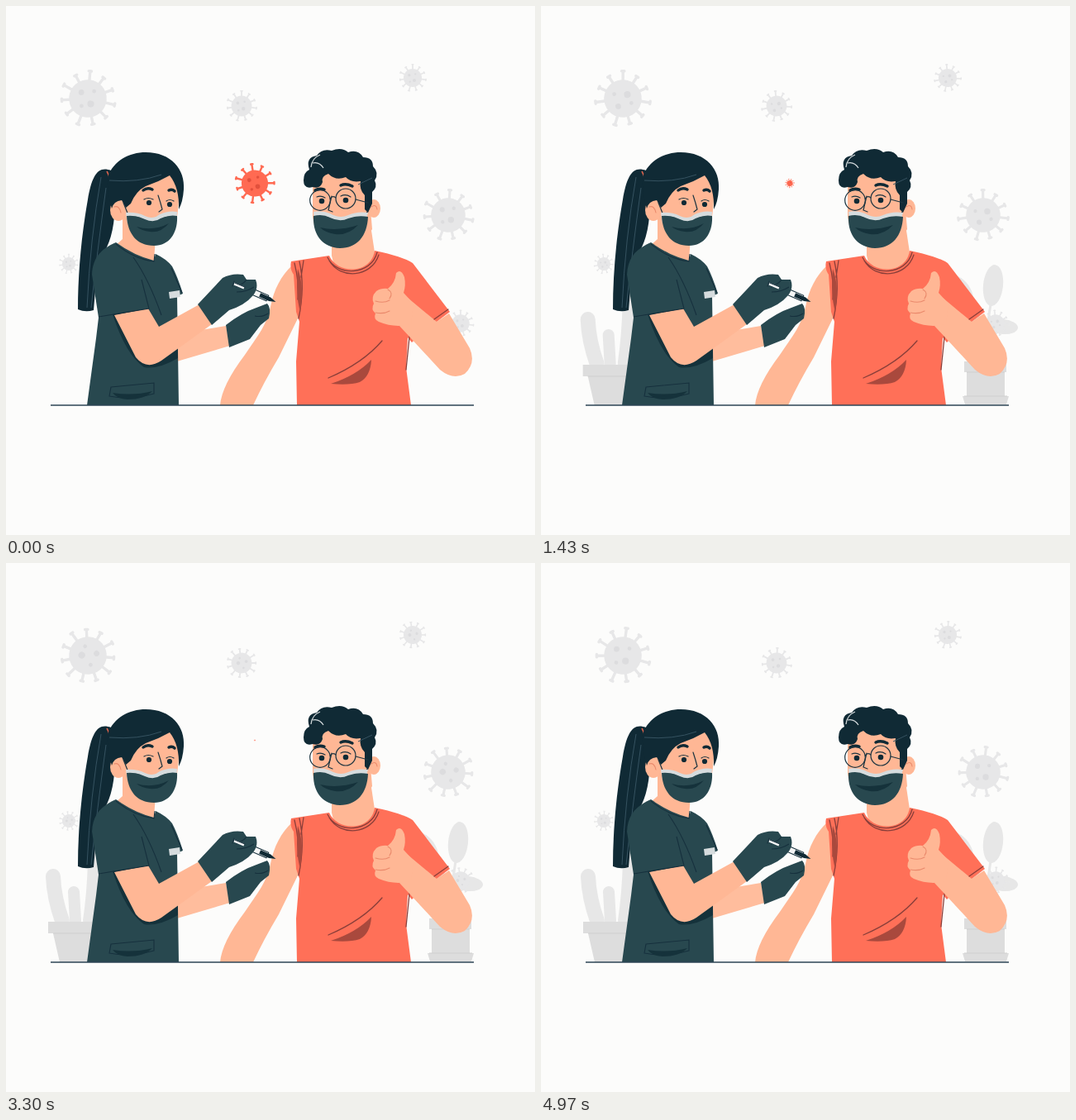
Recreate the animation shown at these times as an HTML page. Size 640 px wide and 640 px high, loop 5010 ms.

```html
<!DOCTYPE html>
<html lang="en">
<head>
<meta charset="utf-8">
<title>Vaccination</title>
<style>
  html, body { margin: 0; width: 100%; height: 100%; overflow: hidden; background: #fcfcfb; }
  svg { display: block; width: 100vw; height: 100vh; }
  .skin { fill: #ffb795; }
  .hair { fill: #102a35; }
  .cloth { fill: #28484f; }
  .shirt { fill: #ff7058; }
  .leaf { fill: #e7e7e7; }
  .pot { fill: #dddddd; }
  .pale { fill: #d6dcde; }
  .shade { fill: #15323b; }
  .line { fill: none; stroke: #1b3440; stroke-width: 1.2; stroke-linecap: round; }
  .seam { fill: none; stroke: #16303d; stroke-width: 1.1; }
  .sheen { fill: none; stroke: #355260; stroke-width: 1; }
  .fold { fill: none; stroke: #8a3f3a; stroke-width: 1.3; stroke-linecap: round; }
  .crease { fill: none; stroke: #ea8a6c; stroke-width: 1.1; stroke-linecap: round; }
  .brow { fill: none; stroke: #102a35; stroke-width: 3.4; stroke-linecap: round; }
  .stalk { fill: none; stroke: #e7e7e7; stroke-linecap: round; }
  .rim { fill: none; stroke: #cfcfcf; }
</style>
</head>
<body>
<svg viewBox="0 0 640 640">
  <g id="cactus">
    <path class="stalk" stroke-width="18" d="M57 379Q58 405 68 433"/>
    <path class="stalk" stroke-width="14" d="M82 398L84 433"/>
    <path class="stalk" stroke-width="20" d="M109 360Q108 400 103 433"/>
    <path class="pot" d="M51 434H124V448H119L113 483H65L57 448H51Z"/>
    <path class="rim" d="M57 448H119"/>
  </g>

  <g id="shrub">
    <path class="stalk" stroke-width="3" d="M538 432Q538 390 546 350M538 425Q520 390 505 355M538 418Q545 395 560 390"/>
    <ellipse class="leaf" cx="547" cy="338" rx="12" ry="25" transform="rotate(6 547 338)"/>
    <ellipse class="leaf" cx="507" cy="348" rx="14" ry="23" transform="rotate(-28 507 348)"/>
    <ellipse class="leaf" cx="559" cy="388" rx="18" ry="9" transform="rotate(5 559 388)"/>
    <ellipse class="leaf" cx="528" cy="384" rx="16" ry="9" transform="rotate(25 528 384)"/>
    <path class="pot" d="M512 430H563V443H561V472H566L563 482H513L510 472H515V443H512Z"/>
    <path class="rim" d="M515 443H561M512 472H564"/>
  </g>

  <g id="viruses"></g>

  <g id="nurse">
    <path class="hair" d="M127 199C111 193 104 205 99 234C91 279 87 325 87 367Q96 371 106 368L111 308Q128 290 131 255L138 215Z"/>
    <path class="sheen" d="M115 207Q102 280 98 365M121 220Q110 300 103 365"/>
    <path d="M122 200Q127 208 124 216" fill="none" stroke="#d9634c" stroke-width="1.6"/>
    <path fill="#ffbd9d" d="M180 401L266 387L271 411L200 432Z"/>
    <path class="skin" d="M141 250V282L132 290L150 304L179 308L181 280Z"/>
    <path class="skin" d="M143 215L170 195L208 207Q211 230 207 255L180 288Q154 286 146 262Z"/>
    <ellipse class="skin" cx="136" cy="247" rx="10" ry="13"/>
    <path class="crease" d="M131 243Q137 241 139 250"/>
    <path class="cloth" d="M133 286C115 294 105 304 104 325L112 377L109 402L98 483H209L207 351L214 348Q207 326 201 315Q194 306 181 300L179 308Q155 302 133 286Z"/>
    <path class="shade" d="M129 373L172 366L193 410L208 404V426Q184 440 167 437Q145 422 129 373Z"/>
    <path class="skin" d="M131 374L172 366L185 388L234 361L249 385L188 429Q170 441 157 425Z"/>
    <path class="seam" d="M133 288Q155 306 179 309L180 300M112 376L173 366L164 331M154 304Q173 331 188 374M200 317L213 347M127 461L179 456V469Q151 477 125 472Z"/>
    <path class="shade" d="M129 468Q154 472 177 466Q168 476 147 476Q134 475 129 468Z"/>
    <path class="pale" d="M197 346L210 344L211 352L198 354Z"/>

    <path class="hair" d="M123 207C130 187 149 177 169 177C200 177 217 198 215 222Q214 237 209 246Q210 220 198 205Q184 213 169 218Q157 224 151 239L145 244L140 235Q130 236 128 245Q122 225 123 207Z"/>
    <path class="sheen" d="M125 211Q160 214 188 204"/>
    <path class="brow" d="M166 223Q171 219 177 222M197 223Q201 221 204 224"/>
    <circle class="hair" cx="173" cy="238" r="3.1"/>
    <circle class="hair" cx="198" cy="240" r="3.1"/>
    <path class="line" d="M167 234Q172 231 178 234M194 236Q198 233 203 236M184 229Q187 238 189 246L185 249M142 238L148 253"/>
    <path class="pale" d="M145 250Q158 249 168 254Q178 259 186 252Q197 247 207 249L206 262L147 263Z"/>
    <path class="cloth" d="M146 254Q158 253 168 258Q179 263 187 257Q198 252 207 254C208 273 199 290 179 290C158 290 147 275 146 254Z"/>
    <path class="shade" d="M158 267Q178 273 197 263Q187 275 174 273Q164 272 158 267Z"/>
  </g>

  <g id="patient">
    <path class="skin" d="M346 314C333 326 324 343 320 364C316 385 304 400 289 422Q261 459 259 483H299Q312 455 330 425L353 378L366 340Z"/>
    <path class="skin" d="M394 270V302Q400 332 420 330Q440 328 446 298L441 265Z"/>
    <path class="shirt" d="M391 302L345 309Q343 318 348 325L351 370L355 382L351 430L352 483H490L484 437L486 401L491 407L500 398L537 370L492 311Q480 303 446 296C442 324 402 326 391 302Z"/>
    <path class="fold" d="M389 304C400 328 442 326 449 298M391 308C404 331 442 329 451 301M355 309Q362 340 354 378M349 311Q355 335 353 355M360 308L357 328M390 450Q432 432 455 405M489 391L484 440"/>
    <path d="M393 457Q424 447 442 428Q441 448 428 455Q416 459 393 457Z" fill="#a9493d"/>
    <path fill="#a9493d" d="M353 318Q361 338 356 370Q350 350 353 318Z"/>
    <path class="skin" d="M486 353L521 382L536 372L561 414Q569 432 555 445Q541 453 525 440L476 387Z"/>
    <path class="fold" d="M518 379L535 367"/>
    <path class="skin" d="M462 342Q471 335 472 323Q478 317 482 328Q484 338 481 347L493 360L490 385Q470 390 451 382Q444 379 447 372Q441 367 445 360Q441 352 448 345Q454 341 462 342Z"/>
    <path class="crease" d="M447 357Q457 360 464 356M447 371Q457 373 464 369M462 343Q469 347 464 354"/>

    <path class="skin" d="M371 215L390 198L438 210L443 270Q430 293 402 290Q375 286 371 255Z"/>
    <ellipse class="skin" cx="445" cy="245" rx="8" ry="11"/>
    <path class="crease" d="M442 243Q448 239 449 246"/>
    <path class="hair" d="M371 219Q360 222 360 211Q360 201 367 198Q362 183 376 181Q382 172 394 175Q406 170 414 177Q426 173 432 183Q444 183 444 194Q452 202 446 211Q450 219 443 225V239L438 250L434 246V229Q427 222 429 212Q417 214 411 207Q399 212 390 203Q381 206 383 213Q380 222 371 219Z"/>
    <path d="M369 195Q370 184 380 180M371 190Q379 188 384 196" fill="none" stroke="#d6dcde" stroke-width="1.2"/>
    <path class="sheen" d="M426 216L443 208"/>
    <path class="brow" d="M374 223Q379 220 385 222M405 217Q411 214 419 218"/>
    <circle class="hair" cx="382" cy="236" r="3.3"/>
    <circle class="hair" cx="411" cy="235" r="3.3"/>
    <g class="line">
      <circle cx="380" cy="235" r="12.3"/>
      <circle cx="411" cy="233" r="12"/>
      <path d="M392 233Q395 229 399 232M423 234L438 238M376 231Q381 229 386 232M405 230Q411 227 417 231M394 230L390 247L395 249M437 249L432 263"/>
    </g>
    <path class="pale" d="M372 249Q383 247 392 251Q404 258 414 253Q425 248 438 250L434 264L373 260Z"/>
    <path class="cloth" d="M372 254Q383 251 392 256Q404 262 414 257Q425 253 438 255C437 278 425 293 404 293C382 292 371 276 372 254Z"/>
    <path class="shade" d="M380 268Q402 273 426 265Q414 278 398 276Q386 274 380 268Z"/>
  </g>

  <path class="cloth" d="M266 386Q285 371 303 365L316 360Q321 365 318 378L308 386L295 403L270 413Z"/>
  <g transform="translate(276 336) rotate(23.5)">
    <path class="line" d="M0 -4V4M0 0H24"/>
    <rect x="20" y="-3.5" width="24" height="7" fill="#f4f5f5" stroke="#1b3440"/>
    <path class="hair" d="M34 -2.5H47L55 0L47 2.5H34Z"/>
  </g>
  <path class="cloth" d="M232 361L262 329Q273 323 287 325L291 331L302 331Q306 341 299 350Q289 362 270 368L249 386Z"/>
  <path class="seam" d="M278 340Q288 336 291 331M279 346Q291 346 300 340M301 375Q310 377 317 372"/>
  <path d="M276 336L288 341" stroke="#f4f5f5" stroke-width="3"/>
  <path class="line" d="M276 333L274 339M277 335L289 340"/>
  <path d="M54 483H566" stroke="#2c4555" stroke-width="1.6"/>
</svg>

<script>
const LOOP = 5010;
const layer = document.getElementById('viruses');
const cactus = document.getElementById('cactus');
const shrub = document.getElementById('shrub');

function spikes(radius) {
  let path = '';
  for (let i = 0; i < 11; i++) {
    const angle = (i * 360 / 11 - 90) * Math.PI / 180;
    const reach = radius * (i % 3 ? 0.93 : 0.98);
    const c = Math.cos(angle), s = Math.sin(angle), cap = radius * 0.05;
    path += `M${c * radius * 0.6} ${s * radius * 0.6}L${c * reach} ${s * reach}`;
    path += `M${c * reach - s * cap} ${s * reach + c * cap}L${c * reach + s * cap} ${s * reach - c * cap}`;
  }
  return path;
}

function addVirus(x, y, radius, tilt, color, dots) {
  const node = document.createElementNS('http://www.w3.org/2000/svg', 'g');
  const spots = [[-0.25, -0.2, 0.1], [0.2, -0.28, 0.07], [0.12, 0.18, 0.12], [-0.2, 0.28, 0.07]];
  node.innerHTML = `<path d="${spikes(radius)}" stroke="${color}" stroke-width="${radius * 0.1}" stroke-linecap="round"/>` +
    `<circle r="${radius * 0.67}" fill="${color}"/>` +
    spots.map(([u, v, r]) => `<circle cx="${u * radius}" cy="${v * radius}" r="${r * radius}" fill="${dots}"/>`).join('');
  layer.append(node);
  return { node, x, y, tilt };
}

function poseVirus({ node, x, y, tilt }, turn, scale = 1) {
  node.setAttribute('transform', `translate(${x} ${y}) rotate(${tilt + turn}) scale(${scale})`);
}

const spinning = [
  [99, 112, 34, 5], [285, 121, 18.5, 0], [492, 87, 16.5, 0],
  [535, 253, 31, 4], [76, 312, 12, 0], [550, 384, 16, 0]
].map(([x, y, radius, tilt]) => addVirus(x, y, radius, tilt, '#e7e7e8', '#dcdcde'));
const red = addVirus(301, 214.5, 24, -9, '#ff6a52', '#e2503c');

const remaining = (t, duration) => Math.max(0, 1 - t / duration) ** 3;
const slide = (node, distance) => node.setAttribute('transform', `translate(${distance} 0)`);

function draw(t) {
  const turn = -360 * t / LOOP;
  spinning.forEach(virus => poseVirus(virus, turn));
  poseVirus(red, turn, Math.exp(-t / 950));
  slide(cactus, -137 * remaining(t, 1651));
  slide(shrub, 160 * remaining(t, 1007));
}

const start = performance.now();
function tick() {
  draw((performance.now() - start) % LOOP);
  requestAnimationFrame(tick);
}
draw(0);
requestAnimationFrame(tick);
</script>
</body>
</html>
```
